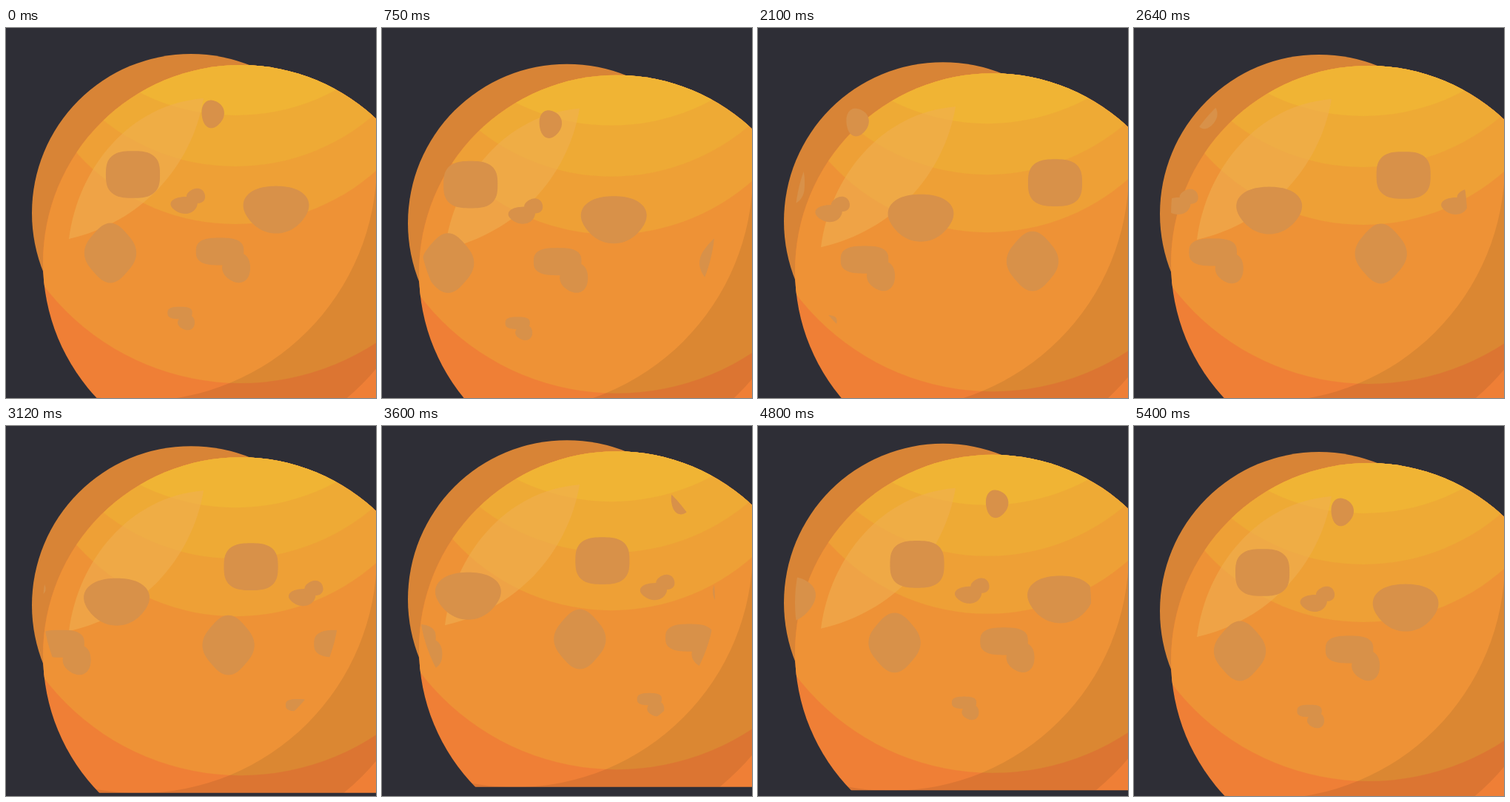
Animation, 500 px wide and 500 px high, one loop 5430 ms. Source, as an HTML page with a canvas:

```html
<!DOCTYPE html>
<html lang="en">
<head>
<meta charset="utf-8">
<title>Planet</title>
<style>
html, body { margin: 0; width: 100%; height: 100%; overflow: hidden; background: #2e2e36; }
canvas { display: block; width: 500px; height: 500px; }
</style>
</head>
<body>
<canvas id="stage" width="500" height="500"></canvas>
<script>
const ctx = document.getElementById('stage').getContext('2d');
const LOOP = 5430, STEP = 30, SWAY = LOOP - STEP;
const SPIN = 375, BOB = 19.5, FLOOR = 503.5;

// Rounded polygon: an ellipse whose radius swells in a few lobes
function addLump(path, x, y, rx, ry, lobes, tilt) {
  for (let a = 0; a < 360; a += 5) {
    const r = 1 + 0.05 * Math.cos(lobes * (a - tilt) * Math.PI / 180);
    const rad = a * Math.PI / 180;
    path[a ? 'lineTo' : 'moveTo'](x + rx * r * Math.cos(rad), y + ry * r * Math.sin(rad));
  }
  path.closePath();
}

const craters = new Path2D();
addLump(craters, 279, 116, 15.2, 18.7, 3, 110);
addLump(craters, 171.5, 198, 38.5, 33.5, 4, 45);
addLump(craters, 365, 244, 44, 32, 3, 90);
addLump(craters, 141, 304, 33.5, 38.5, 4, 90);
// Uneven craters are two lumps joined
addLump(craters, 241, 239, 18, 11.5, 3, 80);
addLump(craters, 257, 227, 12.5, 10, 3, 50);
addLump(craters, 289, 302, 34, 19.5, 4, 45);
addLump(craters, 312, 324, 19, 20, 3, 60);
addLump(craters, 235, 385, 17.5, 8.7, 4, 45);
addLump(craters, 244, 398, 11.5, 10.2, 3, 60);

function circle(x, y, r) {
  const path = new Path2D();
  path.arc(x, y, r, 0, Math.PI * 2);
  return path;
}

function fill(path, color) {
  ctx.fillStyle = color;
  ctx.fill(path);
}

const back = circle(250, 250, 215);
const front = circle(317, 317, 267);
const surface = circle(250, 250, 200);
const shadeEdge = circle(250, 250, 327);
const bands = [
  [circle(317, 146, 334), '#ee9236'],
  [circle(310, -22, 287), '#eea036'],
  [circle(310, -100, 287), '#eeaa35'],
  [circle(310, -169, 287), '#f0b434']
];
const glow = new Path2D('M85 285C97 190 166 103 267 95C251 188 182 263 85 285Z');

const shade = new Path2D();
shade.arc(180, 183, 321, 0, Math.PI * 0.75);
shade.lineTo(0, 600);
shade.lineTo(700, 600);
shade.lineTo(700, 183);
shade.closePath();

// Cubic easing: linear start, soft stop
function ease(u) {
  const mix = (s, a, b) => 3 * s * (1 - s) ** 2 * a + 3 * s * s * (1 - s) * b + s ** 3;
  let lo = 0, hi = 1;
  for (let i = 0; i < 24; i++) {
    const mid = (lo + hi) / 2;
    if (mix(mid, 0.167, 0.667) < u) lo = mid; else hi = mid;
  }
  return mix(lo, 0.167, 1);
}

function bob(t) {
  const q = t / SWAY * 4;
  const u = q < 1 ? q : q < 3 ? 2 - q : q - 4;
  return BOB * Math.sign(u) * ease(Math.abs(u));
}

function drawFront() {
  fill(front, '#ef7f36');
  ctx.save();
  ctx.clip(front);
  bands.forEach(([path, color]) => fill(path, color));
  fill(glow, 'rgba(240,176,80,.6)');
  ctx.clip(shadeEdge);
  fill(shade, 'rgba(0,0,0,.08)');
  ctx.restore();
}

function drawCraters(p) {
  ctx.save();
  ctx.clip(surface);
  ctx.translate(-SPIN * p, 0);
  fill(craters, '#d89149');
  ctx.translate(SPIN, 0);
  fill(craters, '#d89149');
  ctx.restore();
}

function draw(t) {
  ctx.fillStyle = '#2e2e36';
  ctx.fillRect(0, 0, 500, 500);
  ctx.save();
  ctx.translate(0, bob(t));
  ctx.beginPath();
  ctx.rect(0, 0, 700, FLOOR);
  ctx.clip();
  fill(back, '#d88436');
  drawFront();
  drawCraters(t / LOOP);
  ctx.restore();
}

const start = performance.now();
function tick() {
  const t = Math.max(0, performance.now() - start) % LOOP;
  draw(Math.floor(t / STEP) * STEP);
  requestAnimationFrame(tick);
}
tick();
</script>
</body>
</html>
```
